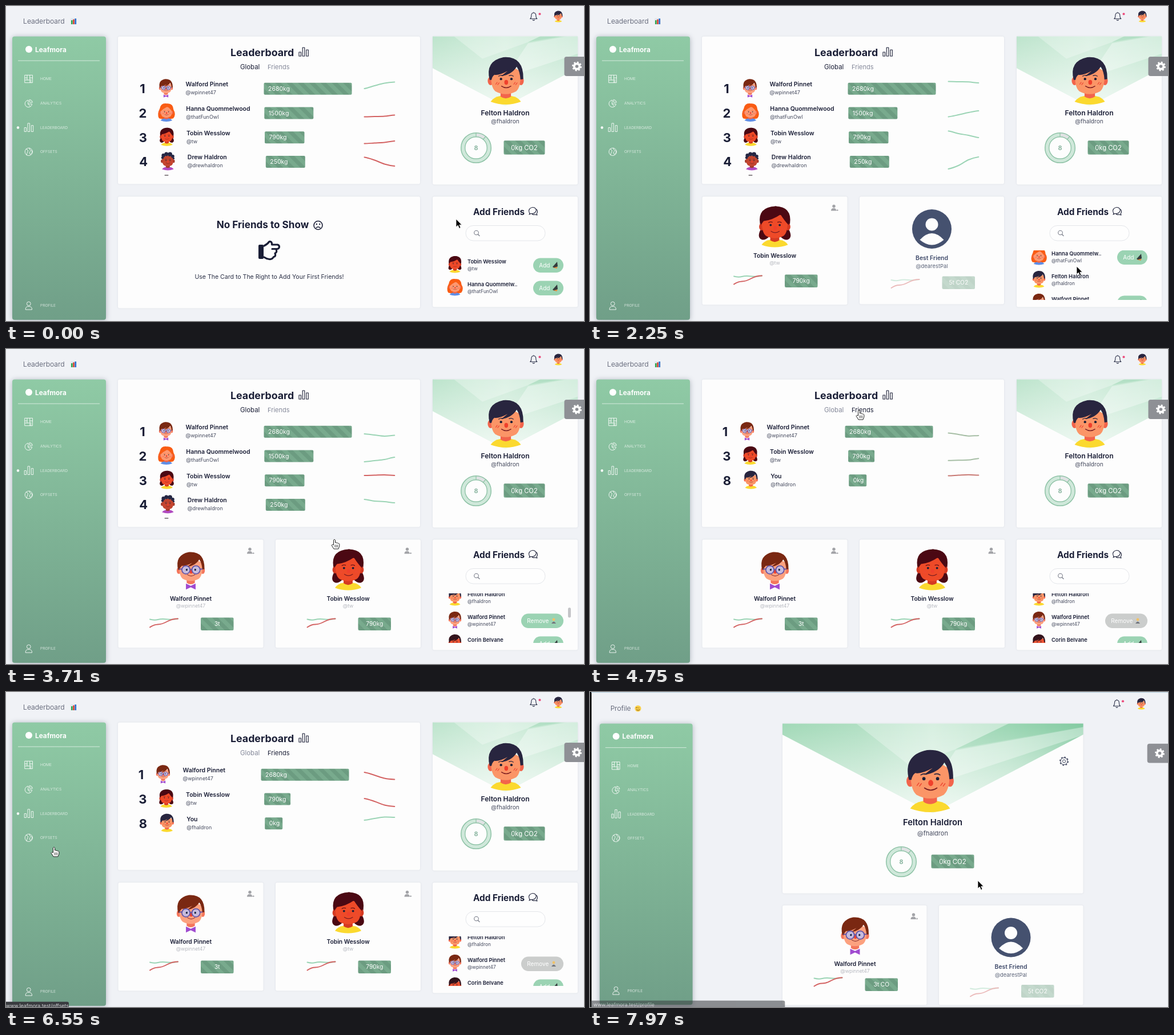
Animation, 1012 px wide and 553 px high, one loop 8000 ms. Source, as an HTML page:

```html
<!DOCTYPE html>
<html lang="en">
<head>
<meta charset="utf-8">
<title>Leaderboard</title>
<style>
html,body{margin:0;width:100%;height:100%;overflow:hidden;background:#f0f2f6}
#stage{display:block;width:100vw;height:100vh;font-family:Inter,"Open Sans",sans-serif}
.card{fill:#fdfdfd;filter:drop-shadow(0 0 1.5px #1a1e3618)}
.line{fill:none;stroke-linecap:round;stroke-linejoin:round}
</style>
</head>
<body>
<svg id="stage" viewBox="0 0 1012 553"></svg>
<script>
const INK = '#1a1e36', SOFT = '#454a5e', GREEN = [155, 212, 181], RED = [211, 98, 98], LOOP = 8000;
const ZOOM = .992, ZX = 6, ZY = 2.4;

const people = {
  ri: ['Walford Pinnet', '@wpinnet47'],
  ha: ['Hanna Quommelwood', '@thatFunOwl'],
  to: ['Tobin Wesslow', '@tw'],
  dr: ['Drew Haldron', '@drewhaldron'],
  fe: ['Felton Haldron', '@fhaldron'],
  co: ['Corin Belvane', '@cbelvane']
};

// ---- drawing helpers
const group = (x, y, s, inner) => `<g transform="translate(${x} ${y}) scale(${s})">${inner}</g>`;
const layer = (id, inner) => `<g id="${id}">${inner}</g>`;
const text = (x, y, s, size, weight = 400, fill = INK, anchor = 'start') =>
  `<text x="${x}" y="${y}" font-size="${size}" font-weight="${weight}" fill="${fill}" text-anchor="${anchor}">${s}</text>`;
const mid = (x, y, s, size, weight, fill) => text(x, y, s, size, weight, fill, 'middle');
const rect = (x, y, w, h, fill, r = 0, more = '') =>
  `<rect x="${x}" y="${y}" width="${w}" height="${h}" rx="${r}" fill="${fill}" ${more}/>`;
const card = (x, y, w, h) => rect(x, y, w, h, '#fdfdfd', 3, 'class="card"');
const dot = (x, y, r, fill, more = '') => `<circle cx="${x}" cy="${y}" r="${r}" fill="${fill}" ${more}/>`;
const ring = (x, y, r, color, w, dash = '') =>
  dot(x, y, r, 'none', `stroke="${color}" stroke-width="${w}" stroke-dasharray="${dash}"`);
const shape = (d, fill) => `<path d="${d}" fill="${fill}"/>`;
const line = (d, color, w = 1, id = '') =>
  `<path class="line" d="${d}" stroke="${color}" stroke-width="${w}" id="${id}"/>`;
const oval = (x, y, rx, ry, fill) => `<ellipse cx="${x}" cy="${y}" rx="${rx}" ry="${ry}" fill="${fill}"/>`;

const badge = (x, y, w, h, label, size = 10.5, tx = w / 2, anchor = 'middle') => group(x, y, 1,
  rect(0, 0, w, h, 'url(#stripe)', 2) + text(tx, h / 2 + size * .36, label, size, 400, '#fff', anchor));

// ---- avatars, 100 units high around x = 0
function head({skin, shade, hair, shirt, back = '', front, extra = ''}) {
  return shape(back, hair)
    + (shirt ? shape('M-32 94Q-25 84-12 82H12Q26 84 32 94Q0 106-32 94Z', shirt) : '')
    + shape('M-11 68H11V83Q0 91-11 83Z', shade)
    + oval(-32, 50, 6, 9, shade) + oval(32, 50, 6, 9, shade)
    + shape('M-31 30Q-33 62-22 72Q0 84 22 72Q33 62 31 30Q0 8-31 30Z', skin)
    + shape(front, hair)
    + line('M-15 40Q-10 37-6 39M7 39Q12 37 16 40', hair, 1.5)
    + dot(-10, 46, 2.6, INK) + dot(12, 46, 2.6, INK)
    + oval(1, 53, 4, 5, '#f0402c')
    + line('M-9 61Q1 68 11 61', '#7c1f22', 1.6)
    + line('M-21 57L-18 53M-17 58L-14 54M17 57L20 53M21 58L24 54', '#ee4a35', 1.5) + extra;
}
const shortHair = 'M-34 48Q-44 8-5 0Q38-3 37 46L31 47Q30 30 23 20Q13 37-10 40L4 29Q-14 39-24 37Q-29 41-30 48Z';
const fringe = 'M-34 46Q-36 6 2 0Q37 4 34 46Q24 36 14 20Q-6 34-27 36Z';
const bob = 'M-36 42Q-42 2 2 0Q42 1 37 42L34 56Q45 78 30 82Q20 82 14 74H-14Q-20 82-30 82Q-45 78-34 56Z';
const waves = 'M-34 46Q-34 12 3 9Q34 12 33 46Q24 32 6 17Q-16 28-34 46Z';
const curls = [[-29, 31, 7], [-24, 18, 10], [-8, 11, 11], [12, 12, 12], [27, 23, 9], [32, 35, 5]];
const art = {
  fe: head({skin: '#fb9567', shade: '#f2644b', hair: '#28253f', shirt: '#fbd92f', front: shortHair}),
  ri: head({skin: '#fca17f', shade: '#f4765c', hair: '#7a2812', front: shortHair,
    extra: `<g fill="#b9c3f6cc" stroke="#5a50a8" stroke-width="2.5"><circle cx="-13" cy="48" r="11"/><circle cx="14" cy="48" r="11"/></g>`
      + line('M-2 47H3M-25 46H-31M25 46H31', '#5a50a8', 2.5) + dot(-11, 48, 2.5, INK) + dot(12, 48, 2.5, INK)
      + shape('M-13 85L0 91L13 85V101L0 95L-13 101Z', '#a04bd0')}),
  ha: head({skin: '#fd9871', shade: '#f1684a', hair: '#f95c14', shirt: '#5f8ee6', front: waves,
    back: 'M-36 28Q-30-4 2 1Q36-3 39 34Q55 60 38 82Q0 95-40 82Q-53 60-36 28Z'}),
  to: head({skin: '#ee4a28', shade: '#d53a22', hair: '#4b0813', shirt: '#fbd92f', front: fringe, back: bob}),
  dr: head({skin: '#c2452f', shade: '#a23a2a', hair: '#252744', shirt: '#b04ac0', front: '',
    extra: curls.map(c => dot(...c, '#252744')).join('')}),
  co: head({skin: '#ef5434', shade: '#d53a22', hair: '#33131c', shirt: '#5f8ee6', front: shortHair})
};
const avatar = (who, x, top, h) => group(x, top, h / 100, art[who]);

// ---- icons
const bars = (color, w) => line('M-8 7V0H-4.5V7ZM-1.8 7V-8H1.8V7ZM4.8 7V-4H8.3V7Z', color, w);
const icons = {
  home: line('M-7-7H7V7H-7ZM-3-7V2M-7 2H2V7M2-7V-2H7M2-2V2M-7-2H-3M4 1V7', '#fff', .9),
  pie: line('M-1-6A6.5 6.5 0 1 0 6 1H-1ZM2-7A6 6 0 0 1 7-2H2ZM-1 1L3 6', '#fff', .9),
  globe: ring(0, 0, 7, '#fff', .9) + line('M-5-5Q0-4-2 0T-4 6M1-7Q1-3 5-2T3 5L1 2L3-1', '#fff', .9),
  user: ring(0, -3.5, 3.6, '#fff', .9) + line('M-6 7Q-6 1 0 1.5Q6 1 6 7Z', '#fff', .9)
};
const gear = (x, y) => ring(x, y, 4.7, '#fff', 3.8) + ring(x, y, 7.2, '#fff', 2.6, 2.83);
const leaveIcon = (x, y) => group(x, y, 1, dot(-1, -3, 2.7, '#a3a4a8')
  + shape('M-6 5Q-6 0-1 0.5Q3 0 3 5Z', '#a3a4a8') + line('M2.5 4H6M5 2.8L6.2 4L5 5.2', '#a3a4a8', 1));

// ---- page parts
const donut = (x, y) => group(x, y, 1, ring(0, 0, 23, '#cfe8da', 7)
  + '<path d="M0-23A23 23 0 0 1 15-17.4" fill="none" stroke="#dfe2e3" stroke-width="7"/>'
  + ring(0, 0, 26.3, '#8fc3a7', 1.5) + ring(0, 0, 19.3, '#8fc3a7', 1.4)
  + line('M0-26V-19.5M17-20L12.5-15', '#8fc3a7', 1.2) + mid(0, 4, '8', 11, 600, '#7fae97'));

// translucent rays, with the lowest tip at (ax, ay) in the box
const fan = 'M-264-138V-160H264V-138L0 0Z';
const beams = (x, y, w, h, ax, ay) => `<svg x="${x}" y="${y}" width="${w}" height="${h}">` + group(ax, ay, 1,
  shape(fan, 'url(#rays)')
  + shape('M-135-158H135L40-112L-40-83Z', '#ffffff48')
  + shape('M135-158L40-112L264-152V-158Z', '#7cc69b60')
  + shape('M264-151L40-110L0-50L264-137Z', '#ffffff58')
  + shape(fan, 'url(#fade)')) + '</svg>';

const trend = (x, y) => group(x, y, 1, line('M0 2Q8 4 14 2.5T30 2T49 1', '#9bd4b5', 2)
  + line('M0 16Q7 11 14 11T30 6T49 1', '#d36262', 2));

function friend(x, y, who, label) {
  return card(x - 127, y, 254, 190) + leaveIcon(x + 104.5, y + 20) + friendBody(x, y, who, label);
}
function friendBody(x, y, who, label, trendY = 138, badgeY = 137) {
  const [name, handle] = people[who];
  return avatar(who, x, y + (who === 'ri' ? 22 : 17), who === 'ri' ? 65 : 72)
    + mid(x, y + 107.5, name, 10.3, 600) + mid(x, y + 119.5, handle, 8.8, 300, '#a3a6af')
    + trend(x - 71.5, y + trendY) + badge(x + 17.5, y + badgeY, 57.5, 22.5, label, 10.2);
}
const bestFriend = (x, y) => dot(x, y + 57, 34.5, '#45516f') + dot(x, y + 49, 11, '#fdfdfd')
  + shape(`M${x - 21} ${y + 76}Q${x} ${y + 53} ${x + 21} ${y + 76}Q${x} ${y + 94} ${x - 21} ${y + 76}Z`, '#fdfdfd')
  + mid(x, y + 111.5, 'Best Friend', 10.4, 600, '#3d4868') + mid(x, y + 125.5, '@dearestPal', 9.4, 400, '#5b6378')
  + `<g opacity=".42">${trend(x - 71, y + 144.5)}${badge(x + 18, y + 140, 57.5, 22.5, '5t CO2', 10.2)}</g>`;

function boardRow(i, rank, who, dx, width, kg, name) {
  const y = 145.3 + i * 42.7;
  return mid(239 + dx / 2, y + 8, rank, 22, 700) + avatar(who, 280 + dx, y - 17, 32)
    + text(314.5 + dx, y - 4, name || people[who][0], 10.5, 600)
    + text(314.5 + dx, y + 10, people[who][1], 9, 400, SOFT)
    + badge(451.5 + dx, y - 10.5, width, 21, kg, 10.5, 7.5, 'start');
}

const pill = (id, x, label, emoji) => layer(id, rect(x, -12.5, 976 - x, 25.5, '#9bd3b3', 12.7)
  + text(x + 10.3, 4, label, 10, 400, '#fff') + emoji);
const climber = shape('M957 3L965-6L966 2L960 5Z', '#343b3d') + shape('M958 4L966 3L964 6Z', '#e8893a');
const worker = dot(959, -2, 2.4, '#f0c26a') + shape('M955 5Q959-2 963 5Z', '#71757e');
function listRow(i, who, name) {
  const add = who === 'fe' ? '' : pill('add' + i, 923, 'Add', climber);
  const remove = who === 'to' || who === 'ri' ? pill('remove' + i, 902, 'Remove', worker) : '';
  return group(0, 455 + i * 40, 1, avatar(who, 786, -16, 29.5)
    + text(808, -3.5, name || people[who][0], 9.3, 600) + text(808, 8.8, people[who][1], 8.4, 400, SOFT) + add + remove);
}

const menu = [['home', 'HOME', 128], ['pie', 'ANALYTICS', 171], ['', 'LEADERBOARD', 213.5],
  ['globe', 'OFFSETS', 256], ['user', 'PROFILE', 526]];
const sidebar = rect(11, 53.5, 164, 497.5, 'url(#side)', 4, 'style="filter:drop-shadow(0 1px 5px #2345)"')
  + dot(40, 76, 6, '#fff') + text(51, 80.5, 'Leafmora', 11.8, 700, '#fff') + rect(21, 95.5, 143, 1, '#ffffffa0')
  + menu.map(([icon, label, y]) => group(39.8, y, .95, icon ? icons[icon] : bars('#fff', .9))
    + text(60, y + 2.4, label, 6.7, 300, '#ffffffe0')).join('') + layer('active', dot(21, 213.5, 2.2, '#fff'));

const header = layer('boardHead', text(30, 31, 'Leaderboard', 12.2, 300, SOFT)
    + rect(113, 21.5, 11, 11, '#dfe8ee', 1) + rect(114, 25, 2.6, 7, '#2fa84f') + rect(117.2, 23.5, 2.6, 8.5, '#d9402f')
    + rect(120.4, 22, 2.6, 10, '#2a6fd0'))
  + layer('profileHead', text(30, 31, 'Profile', 12.2, 300, SOFT) + dot(78.6, 26.8, 5.6, '#f8cf4a')
    + line('M75.5 25.5H77.5M80 25.5V26M76 29Q79 31.5 81.5 29', '#7a4a12', 1))
  + group(923.8, 18, 1, line('M-6 4.5Q-4 3-4-1Q-4-6 0-6Q4-6 4-1Q4 3 6 4.5ZM-1.5 6.5Q0 8 1.5 6.5M0-6V-7', '#2b3048', 1.1))
  + dot(934.5, 14, 2.1, '#ec4c7c') + avatar('fe', 967, 8.5, 20);

const emptyCard = card(196, 334.5, 529, 196) + mid(449.5, 390.3, 'No Friends to Show', 17.1, 700)
  + ring(546.5, 385, 7.5, INK, 1.6) + dot(543.8, 383, 1.2, INK) + dot(549.2, 383, 1.2, INK)
  + line('M543 389.5Q546.5 386 550 389.5', INK, 1.4)
  + rect(442, 419, 9, 25, INK, 2)
  + line('M452 421Q458 418 461 413.5Q466 413 465.5 419H475.5Q478.5 420 478.5 423Q478 426 475 426.5H466M473 427Q475 433 471 434Q473 440 468.5 440.5Q466 445 461 444.5Q456 444 452 441', INK, 3.2)
  + mid(461, 478.7, 'Use The Card to The Right to Add Your First Friends!', 10.55, 400, '#2a2f45');

const board = card(196, 53.5, 529, 259) + text(393, 87.8, 'Leaderboard', 17.8, 700)
  + group(521, 81, 1, bars(INK, 1.1))
  + layer('globalTab', text(410, 111, 'Global', 11.4, 400, 'inherit'))
  + layer('friendsTab', text(458, 111, 'Friends', 11, 400, 'inherit'))
  + layer('globalRows', boardRow(0, 1, 'ri', 0, 154, '2680kg') + boardRow(1, 2, 'ha', .8, 86, '1500kg')
    + boardRow(2, 3, 'to', 1.5, 69.5, '790kg') + boardRow(3, 4, 'dr', 3.3, 69, '250kg')
    + rect(277.5, 296.5, 7, 1.2, '#4a4146', .6))
  + layer('friendRows', boardRow(0, 1, 'ri', -5, 154, '2680kg') + boardRow(1, 3, 'to', .6, 46, '790kg')
    + boardRow(2, 8, 'fe', 1.7, 31, '0kg', 'You'))
  + [0, 1, 2, 3].map(i => line('', '', 2, 'spark' + i)).join('');

const profileCard = card(747, 53.5, 254, 260) + beams(747, 53.5, 254, 130, 127, 122) + avatar('fe', 875, 90, 83)
  + mid(874, 192, people.fe[0], 12.1, 600) + mid(874, 206.3, people.fe[1], 10.1, 400, SOFT)
  + donut(823, 249) + badge(871.5, 236.3, 72, 24.5, '0kg CO2', 11.2);

const addCard = card(747, 334.5, 254, 194) + text(818, 367, 'Add Friends', 15.3, 700)
  + line('M917 364Q914 359 917 356Q920 352.5 925 354Q929 356 928 360Q926 365 919 364.5L916 366ZM929 357Q932 361 929 364.5L930 367L926 366Q923 367 921 365', INK, 1.1)
  + rect(805, 385.5, 139, 26.5, '#fefefe', 13, 'stroke="#e4e6ea"')
  + ring(823.5, 398, 3.8, '#777b87', 1.1) + line('M826.5 401L829 403.5', '#777b87', 1.2)
  + '<svg x="747" y="429" width="254" height="87" viewBox="747 429 254 87">'
  + layer('list', listRow(0, 'to') + listRow(1, 'ha', 'Hanna Quommelw..') + listRow(2, 'fe') + listRow(3, 'ri') + listRow(4, 'co'))
  + '</svg>' + layer('thumb', rect(984, 454, 5, 17.5, '#c4c5c8', 2.5));

const boardPage = board + layer('noFriends', emptyCard)
  + layer('oneFriend', friend(323.5, 334.5, 'to', '790kg') + card(472, 334.5, 253, 189) + bestFriend(598.5, 334.5))
  + layer('twoFriends', friend(323.5, 334.5, 'ri', '3t') + friend(599, 334.5, 'to', '790kg'))
  + profileCard + addCard;

const profilePage = `<g transform="scale(${1 / ZOOM}) translate(${-ZX} ${-ZY})">`
  + card(337, 55.5, 526.5, 298) + beams(337, 55.5, 526.5, 170, 263, 157) + avatar('fe', 595.5, 102, 109)
  + mid(600, 234.3, people.fe[0], 14.8, 600) + mid(600, 251.7, people.fe[1], 11, 400, SOFT)
  + donut(545, 298) + badge(597.5, 285.5, 75, 24, '0kg CO2', 11.4)
  + ring(830, 121.5, 7.2, '#3c435c', 1.5, 2.83) + ring(830, 121.5, 6, '#3c435c', 1) + ring(830, 121.5, 2.6, '#3c435c', 1)
  + card(337, 374.5, 252.5, 175) + leaveIcon(567.5, 394) + friendBody(464, 373.5, 'ri', '3t CO', 127, 129)
  + card(611, 374.5, 252.5, 175) + bestFriend(737, 374) + '</g>';

const status = layer('status', rect(-6, 543.8, 116, 24, '#3a3c40', 3, 'id="bubble"')
  + layer('link', text(0, 554, '', 8.8, 400, '#d4d5d8')));

const stage = document.getElementById('stage');
stage.innerHTML = `<defs>
  <pattern id="stripe" width="14" height="14" patternUnits="userSpaceOnUse" patternTransform="rotate(-45)">
    <rect width="14" height="14" fill="#78aa8d"/><rect width="7" height="14" fill="#6c9c81"/></pattern>
  <linearGradient id="side" x2="0" y2="1"><stop stop-color="#8fcaa5"/><stop offset="1" stop-color="#709f88"/></linearGradient>
  <linearGradient id="rays"><stop stop-color="#a0d8b6"/><stop offset=".25" stop-color="#aedec1"/>
    <stop offset=".5" stop-color="#c6e8d3"/><stop offset=".75" stop-color="#acddc0"/><stop offset="1" stop-color="#84caa2"/></linearGradient>
  <linearGradient id="fade" x2="0" y2="1"><stop stop-color="#fff" stop-opacity="0"/>
    <stop offset="1" stop-color="#fff" stop-opacity=".75"/></linearGradient>
  </defs>` + layer('view', rect(-10, -10, 1050, 590, '#f0f2f6') + rect(-30, -10, 26.6, 600, '#000')
    + rect(-4, -4, 1050, 2.7, '#b9d2e0') + header + sidebar + layer('boardPage', boardPage) + layer('profilePage', profilePage)
    + shape('M1030 89H981.5Q977.5 89 977.5 93V119Q977.5 123 981.5 123H1030Z', '#8e9095') + gear(999.5, 106) + status)
  + layer('cursor', layer('arrow', '<path d="M0 0V14L3.3 11L5.6 16.4L8 15.3L5.8 10.2H10Z" fill="#000" stroke="#fff" stroke-width=".8"/>')
    + layer('hand', '<path d="M-1.5 1.5Q0-1 1.5 1.5V6Q3 5 4 6.5Q5.5 5.8 6.3 7.2Q8 6.5 8.8 8.5V12L7 17H-1L-5 10.5Q-4.5 8.5-1.5 10Z" fill="#fff" stroke="#222" stroke-linejoin="round"/>'
      + line('M1 10V14M3.3 10V14M5.6 10V14', '#222', .8)));

// ---- motion
const $ = id => document.getElementById(id);
const show = (id, on) => $(id).setAttribute('display', on ? 'inline' : 'none');
const set = (id, key, value) => $(id).setAttribute(key, value);
const clamp = v => Math.min(1, Math.max(0, v));
const mix = (a, b, k) => a + (b - a) * k;
const ease = (t, from, to) => { const k = clamp((t - from) / (to - from)); return k * k * (3 - 2 * k); };

const ADD_ONE = 1400, ADD_TWO = 3050, TAB = 4700, PAGE = 7100;

// time, x, y of the pointer
const track = [[0, 788, 374], [880, 974, 463], [1500, 974, 463], [2050, 852, 457], [2450, 852, 457], [2850, 940, 477],
  [3150, 940, 477], [3710, 575, 334], [4350, 471, 107], [5500, 471, 107], [6550, 84, 272], [6950, 76, 524],
  [7200, 76, 524], [7850, 679, 331], [LOOP, 679, 331]];
const handTimes = [[780, 1650], [2700, 5600], [6250, 7250]];

// per event: four heights for each row, and its colour
const trends = [
  {at: -1000, rows: [[145, 140, 135.5, 133.5, GREEN], [194.5, 194, 193.5, 191.5, RED], [241.5, 240.5, 239.5, 237, RED], [265.5, 270.5, 277.5, 281, RED]]},
  {at: ADD_ONE, rows: [[132.5, 133, 133.3, 135, GREEN], [194.5, 191, 187, 184, GREEN], [219.5, 224, 227, 231, GREEN], [286, 280, 270, 265, GREEN]]},
  {at: ADD_TWO, rows: [[149, 151, 153, 151.5, GREEN], [198, 196, 194, 190, GREEN], [222, 221.5, 221, 222, RED], [264, 267, 268, 270, GREEN]]},
  {at: TAB, rows: [[141, 146, 151.5, 153.5, RED], [187, 192, 198.5, 201, RED], [225, 222, 219.5, 220, GREEN], [264, 267, 268, 270, GREEN]]}
];

function curve(y) {
  let d = `M627.5 ${y[0]}`;
  for (let i = 0; i < 3; i++) {
    const x = 627.5 + i * 17.6, a = (y[i + 1] - y[Math.max(0, i - 1)]) / 6, b = (y[Math.min(3, i + 2)] - y[i]) / 6;
    d += `C${x + 5.9} ${y[i] + a} ${x + 11.7} ${y[i + 1] - b} ${x + 17.6} ${y[i + 1]}`;
  }
  return d;
}

function drawTrends(t) {
  const n = trends.findLastIndex(e => t >= e.at), now = trends[n], old = trends[Math.max(0, n - 1)];
  const k = 1 - (1 - clamp((t - now.at) / 500)) ** 2;
  now.rows.forEach((row, i) => {
    const from = old.rows[i];
    set('spark' + i, 'd', curve([0, 1, 2, 3].map(j => mix(from[j], row[j], k))));
    set('spark' + i, 'stroke', `rgb(${row[4].map((c, j) => Math.round(mix(from[4][j], c, k)))})`);
  });
}

function drawCursor(t) {
  const i = track.findIndex(p => p[0] > t), [t0, x0, y0] = track[i - 1], [t1, x1, y1] = track[i];
  const k = ease(t, t0, t1), hand = handTimes.some(([a, b]) => t >= a && t < b);
  set('cursor', 'transform', `translate(${mix(x0, x1, k)} ${mix(y0, y1, k)})`);
  show('hand', hand);
  show('arrow', !hand);
}

function drawStatus(t) {
  const profile = t >= 6800;
  show('status', profile || t >= 6400 && t < 6750);
  $('link').firstChild.textContent = 'www.leafmora.test/' + (profile ? 'profile' : 'offsets');
  set('bubble', 'width', mix(116, 344, profile ? ease(t, 7250, 7450) : 0));
  set('status', 'opacity', mix(1, .55, ease(t, 7700, 7960)));
}

function draw(t) {
  const friends = t >= TAB, profile = t >= PAGE, z = ease(t, 6750, 7500);
  set('view', 'transform', `translate(${ZX * z} ${ZY * z}) scale(${mix(1, ZOOM, z)})`);
  for (const id of ['boardPage', 'boardHead', 'active']) show(id, !profile);
  for (const id of ['profilePage', 'profileHead']) show(id, profile);
  show('noFriends', t < ADD_ONE);
  show('oneFriend', t >= ADD_ONE && t < ADD_TWO);
  show('twoFriends', t >= ADD_TWO);
  show('globalRows', !friends);
  show('friendRows', friends);
  show('spark3', !friends);
  set('globalTab', 'fill', friends ? '#85899a' : INK);
  set('friendsTab', 'fill', friends ? INK : '#85899a');
  for (const [i, at] of [[0, ADD_ONE], [3, ADD_TWO]]) {
    show('add' + i, t < at);
    show('remove' + i, t >= at);
    $('remove' + i).firstChild.setAttribute('fill', t < at + 1050 ? '#9bd3b3' : '#cbcdcc');
  }
  set('list', 'transform', `translate(0 ${-54 * ease(t, 1650, 2100) - 44 * ease(t, 2450, 2800)})`);
  set('thumb', 'opacity', ease(t, 2450, 2550) - ease(t, 3900, 4150));
  drawTrends(t);
  drawStatus(t);
  drawCursor(t);
}

const start = performance.now();
function tick() {
  draw((performance.now() - start) % LOOP);
  requestAnimationFrame(tick);
}
tick();
</script>
</body>
</html>
```
